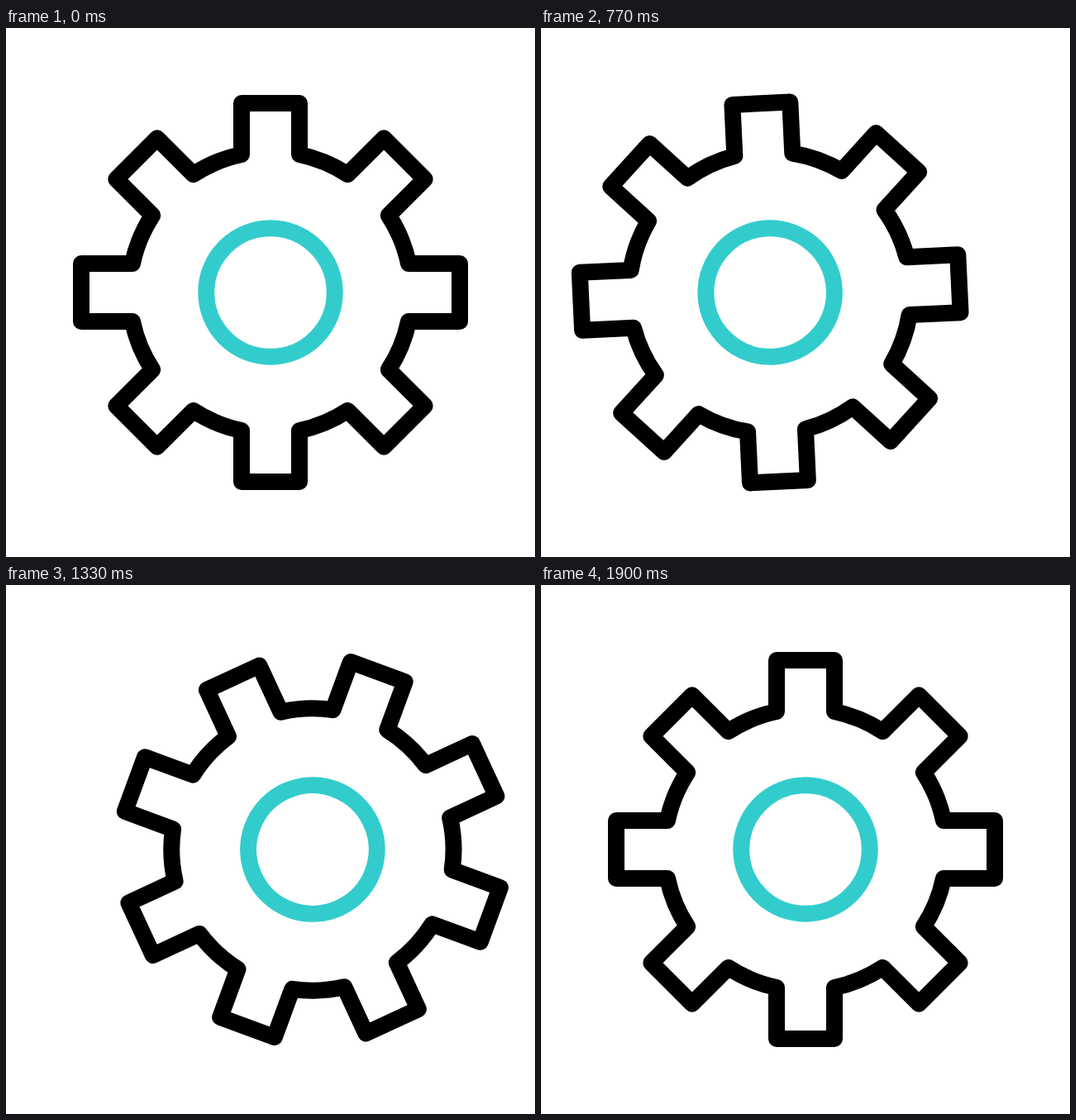
An HTML page that plays this animation: 640x640 px, repeating every 2 s.

```html
<!DOCTYPE html>
<html lang="en">
<head>
<meta charset="utf-8">
<title>Rolling gear</title>
<style>
  html, body { margin: 0; width: 100%; height: 100%; overflow: hidden; background: #fff; }
  svg { display: block; width: 100vw; height: 100vh; }
  path, circle { fill: none; stroke-width: 20; stroke-linejoin: round; }
  path { stroke: #000; }
  circle { stroke: #3cc; }
</style>
</head>
<body>
<svg viewBox="0 0 640 640">
  <g id="wheel">
    <path id="teeth"/>
    <circle r="77.75"/>
  </g>
</svg>
<script>
  const LOOP = 2000;
  const END = 57; // last moving step; the gear rests until the loop restarts

  // Keys are [step, value, slope]; without a slope the motion eases to a stop.
  const SHIFT = [[0, 0, -1.35], [19, -52], [40.8, 51.3], [END, 0]];
  const TURN = [[0, 0], [17.4, -72], [32, 30.2, 7], [45, 70], [END, 0]];

  function ease(keys, t) {
    const i = Math.max(1, keys.findIndex(([step]) => step >= t));
    const [t0, a, m0 = 0] = keys[i - 1];
    const [t1, b, m1 = 0] = keys[i];
    const d = t1 - t0;
    const u = (t - t0) / d;
    const v = 1 - u;
    return a + (b - a) * u * u * (3 - 2 * u) + d * u * v * (m0 * v - m1 * u);
  }

  function gearPath(count, half, root, tip) {
    const radius = Math.hypot(half, root);
    const corners = [[-half, -root], [-half, -tip], [half, -tip], [half, -root]];
    const teeth = Array.from({ length: count }, (_, i) => {
      const angle = i * 2 * Math.PI / count;
      const c = Math.cos(angle), s = Math.sin(angle);
      return corners.map(([x, y]) => `${x * c - y * s} ${x * s + y * c}`).join("L");
    });
    const arc = `A${radius} ${radius} 0 0 1 `;
    return `M${teeth.join(arc)}${arc}${-half} ${-root}Z`;
  }

  const wheel = document.getElementById("wheel");
  document.getElementById("teeth").setAttribute("d", gearPath(8, 35, 167, 229));

  const start = performance.now();

  function draw() {
    const ms = (performance.now() - start) % LOOP;
    // 30 steps a second, switching on whole hundredths
    const step = Math.min(END, Math.floor((Math.floor(ms / 10) + 0.5) * 0.3));
    const x = 320 + ease(SHIFT, step);
    wheel.setAttribute("transform", `translate(${x} 320) rotate(${ease(TURN, step)})`);
    requestAnimationFrame(draw);
  }
  draw();
</script>
</body>
</html>
```
